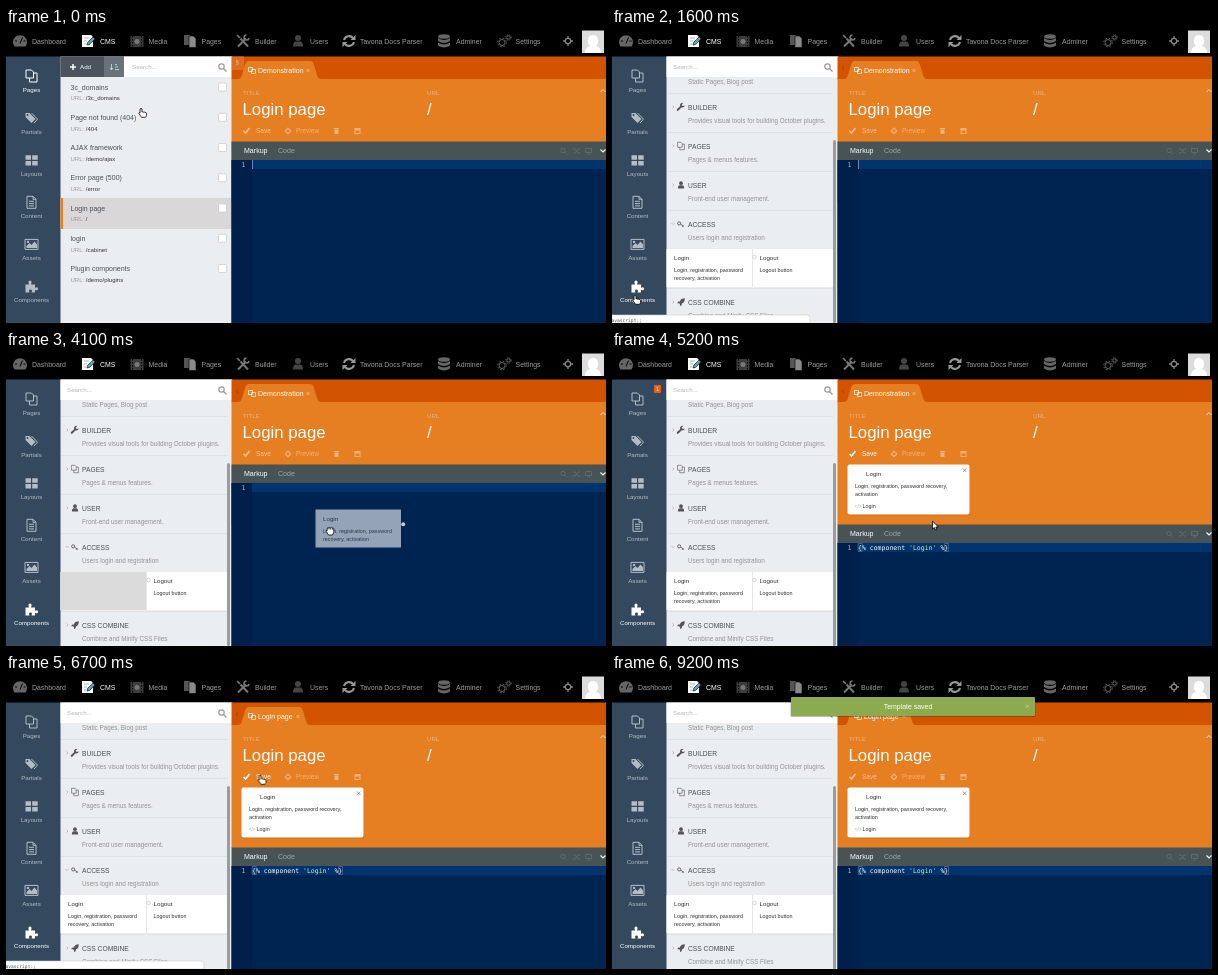
These frames come from a looping animation (600x295 px, 9600 ms). An HTML page:

```html
<!DOCTYPE html>
<html lang="en">
<head>
<meta charset="utf-8">
<title>Component drop</title>
<style>
html, body { margin: 0; width: 100%; height: 100%; overflow: hidden; background: #000; }
svg { display: block; width: 600px; height: 295px; font-family: "Liberation Sans", Arial, sans-serif; fill: currentColor; }
text { white-space: pre; }
.o { fill: none; stroke: currentColor; }
.mid { text-anchor: middle; }
.code { font: 6.53px "DejaVu Sans Mono", monospace; }
.cut { animation: 9.6s step-end infinite; }
.move { animation: 9.6s linear infinite; }

.list { animation-name: list; }
.comps { animation-name: comps; }
.off { animation-name: off; }
.on { animation-name: on; }
.status { animation-name: status; }
.caret { animation-name: caret; }
.ghost { animation-name: ghost; }
.drop { animation-name: drop; }
.pane { animation-name: pane; }
.badge { animation-name: badge; }
.save { animation-name: save; }
.old { animation-name: old; }
.new { animation-name: new; }
.toast { animation-name: toast; }
.pointer { animation-name: pointer; }
.drag { animation-name: drag; }
.hand { animation-name: hand; }
.arrow { animation-name: arrow; }

@keyframes list { 0% { opacity: 1 } 9.3%, to { opacity: 0 } }
@keyframes comps { 0% { opacity: 0 } 9.3%, to { opacity: 1 } }
@keyframes off { 0% { color: #fff } 9.3%, to { color: #b3bdc6 } }
@keyframes on { 0% { color: #b3bdc6 } 9.3%, to { color: #fff } }
@keyframes status { 0% { opacity: 0 } 10.4% { opacity: 1 } 26% { opacity: 0 } 60.3% { opacity: 1 } 84.3%, to { opacity: 0 } }
@keyframes caret { 0% { opacity: 1 } 31.2%, to { opacity: 0 } }
@keyframes ghost { 0% { opacity: 0 } 31.2% { opacity: 1 } 46.8%, to { opacity: 0 } }
@keyframes drop { 0% { opacity: 0 } 46.8%, to { opacity: 1 } }
@keyframes pane { 0% { transform: none } 46.8%, to { transform: translateY(60px) } }
@keyframes badge { 0% { opacity: 0 } 47.8% { opacity: 1 } 69.7%, to { opacity: 0 } }
@keyframes save { 0% { color: #f5c295 } 47.8% { color: #fff } 84.3%, to { color: #f5c295 } }
@keyframes old { 0% { opacity: 1 } 69.7%, to { opacity: 0 } }
@keyframes new { 0% { opacity: 0 } 69.7%, to { opacity: 1 } }
@keyframes toast {
  0%, 70.8% { opacity: 0; transform: translateY(-8px) }
  75%, to { opacity: 1; transform: none }
}
@keyframes pointer {
  0%, 1% { transform: translate(134px, 80px); animation-timing-function: ease-in-out }
  8.4%, 17% { transform: translate(22px, 267px); animation-timing-function: ease-in-out }
  24%, 35.4% { transform: translate(70px, 242px); animation-timing-function: ease-in-out }
  42%, 46.8% { transform: translate(324px, 180px) }
  53%, 56.5% { transform: translate(320px, 170px); animation-timing-function: ease-in-out }
  62%, 83% { transform: translate(253.5px, 101px); animation-timing-function: ease-in }
  89.6%, to { transform: translate(594px, 300px) }
}
@keyframes hand { 0% { opacity: 1 } 23.9% { opacity: 0 } 60.3% { opacity: 1 } 84.3%, to { opacity: 0 } }
@keyframes drag { 0% { opacity: 0 } 23.9% { opacity: 1 } 46.8%, to { opacity: 0 } }
@keyframes arrow { 0% { opacity: 0 } 46.8% { opacity: 1 } 60.3% { opacity: 0 } 84.3%, to { opacity: 1 } }
</style>
</head>
<body>
<svg viewBox="0 0 600 295">
  <rect width="600" height="295" fill="#000"/>
  <g id="nav"></g>
  <rect x="576" y="2.5" width="22" height="22.5" fill="#dcdcdc"/>
  <path d="M579 25q0-6 5-7q-3-3-2-7q1-4 5-4t5 4q1 4-2 7q5 1 5 7z" fill="#fff"/>

  <rect y="28.5" width="55" height="267" fill="#34495e"/>
  <g id="side"></g>
  <g class="cut badge">
    <rect x="42" y="34" width="7" height="8" rx="1" fill="#e2621b"/>
    <text x="45.5" y="40" font-size="5.5" class="mid" fill="#fff">1</text>
  </g>

  <rect x="54.5" y="28.5" width="172" height="267" fill="#ebeef0"/>
  <g class="cut list" id="list"></g>
  <g class="cut comps" id="comps"></g>
  <g fill="none" stroke="#999" stroke-width="1.2"><circle cx="215.5" cy="38.5" r="2.7"/><path d="M217.5 40.5l3 3"/></g>

  <g id="editor">
    <rect x="225.5" y="28.5" width="375" height="23" fill="#d35400"/>
    <path d="M232 38l-2 2 2 2" class="o" color="#a94300"/>
    <g class="cut list">
      <rect x="226" y="28.5" width="12" height="13.5" fill="#dd6d20"/>
      <text x="229.5" y="36" font-size="6" fill="#f3c9a8">§</text>
    </g>
    <g font-size="7" fill="#fff">
      <g class="cut old">
        <path d="M232 51q3 0 4-4l3-10q1-4 4-4h61q3 0 4 4l3 10q1 4 4 4z" fill="#e67e22"/>
        <text x="252" y="44.7">Demonstration</text>
        <path d="M300.5 41l3 3m0-3l-3 3" class="o" color="#f3bf91" stroke-width=".8"/>
      </g>
      <g class="cut new">
        <path d="M232 51q3 0 4-4l3-10q1-4 4-4h50q3 0 4 4l3 10q1 4 4 4z" fill="#e67e22"/>
        <text x="252" y="44.7">Login page</text>
        <path d="M290.5 41l3 3m0-3l-3 3" class="o" color="#f3bf91" stroke-width=".8"/>
      </g>
    </g>
    <rect x="225.5" y="51" width="375" height="123" fill="#e67e22"/>
    <path class="o" color="#fff" d="M242.5 39.5h4v4h-4zM245.5 41.5h4v4h-4z" stroke-width=".7"/>
    <g font-size="6.2" fill="#f1b27c"><text x="237" y="67">TITLE</text><text x="421" y="67">URL</text></g>
    <g font-size="16.8" fill="#fff"><text x="236.5" y="87">Login page</text><text x="421" y="87">/</text></g>
    <path d="M594.5 64l2.5-2.5 2.5 2.5" class="o" color="#f8dcc2"/>
    <g class="cut save">
      <path d="M237.5 103l2 2 4-5" class="o" stroke-width="1.6"/>
      <text x="250" y="105.3" font-size="6.5">Save</text>
    </g>
    <g color="#f2b37d">
      <path class="o" d="M282 100.2l2.7 2.7-2.7 2.7-2.7-2.7z" stroke-width="1.2"/>
      <text x="290" y="105.3" font-size="6.5">Preview</text>
      <path d="M328 100h5v1h-5zM328.5 101.5h4v4.5h-4zM348.5 100h6v6h-6z"/>
      <path d="M349.5 102.5h4v2.5h-4z" fill="#e67e22"/>
    </g>
    <g class="cut drop">
      <rect x="236" y="114.5" width="122" height="50" rx="2" fill="#b9651b" opacity=".6"/>
      <rect x="235.5" y="113.5" width="122" height="50" rx="2" fill="#fff"/>
      <path d="M351 117.5l3.4 3.4m0-3.4l-3.4 3.4" class="o" color="#777" stroke-width=".7"/>
      <text x="254" y="124.5" font-size="6.2" fill="#333">Login</text>
      <g font-size="5.4" fill="#333">
        <text x="243" y="137">Login, registration, password recovery,</text>
        <text x="243" y="145">activation</text>
        <text x="250.5" y="157">Login</text>
        <text x="242.5" y="156.8" fill="#aaa" font-size="5">&lt;/&gt;</text>
      </g>
    </g>
    <g class="cut pane">
      <rect x="225.5" y="113.5" width="375" height="19" fill="#475354"/>
      <text x="238" y="125.3" font-size="7.05" fill="#fff">Markup</text>
      <text x="272" y="125.3" font-size="7.05" fill="#9da5a5">Code</text>
      <g class="o" color="#5e6a6b">
        <circle cx="557" cy="122.5" r="2.2"/><path d="M558.5 124l2.5 2.5M567 121h2l3 4h2M567 125h2l3-4h2M579.5 120.5h6v4h-6zM581 126h3"/>
        <path d="M594.5 121.5l2.5 2.5 2.5-2.5" stroke="#fff" stroke-width="1.1"/>
      </g>
      <rect x="225.5" y="132" width="375" height="163" fill="#002451"/>
      <rect x="225.5" y="132" width="20.5" height="163" fill="#00204b"/>
      <rect x="246" y="132" width="354" height="9" fill="#00346e"/>
      <text x="235.5" y="139.3" class="code" fill="#a5b5d0">1</text>
      <rect class="cut caret" x="246" y="132" width=".8" height="9" fill="#7d9cc6"/>
      <g class="cut drop">
        <path class="o" color="#54739c" d="M246.2 132.5h4v8h-4zM332.5 132.5h4v8h-4z" stroke-width=".7"/>
        <text x="246" y="139.3" class="code" fill="#fff">{% component <tspan fill="#d1f1a9">'Login'</tspan> %}</text>
      </g>
    </g>
  </g>

  <g class="cut status">
    <path d="M0 287h195q3 0 3 3v5h-198z" fill="#fff" stroke="#ccc" stroke-width=".6"/>
    <text x="-.5" y="293.8" font-size="4.6" font-family="DejaVu Sans Mono, monospace" fill="#555">avascript:;</text>
  </g>

  <g class="move toast">
    <rect x="178.5" y="23" width="245" height="20" rx="1.5" opacity=".25" fill="#000"/>
    <rect x="179" y="23" width="244" height="19" rx="1" fill="#8cab50"/>
    <text x="296" y="35" font-size="6.95" fill="#fff" class="mid">Template saved</text>
    <path d="M413.8 30.5l3.4 3.4m0-3.4l-3.4 3.4" class="o" color="#bdd093" stroke-width=".9"/>
  </g>

  <g class="move pointer">
    <g class="cut ghost">
      <rect x="-14.5" y="-21.5" width="85.5" height="38" fill="#fff" opacity=".58"/>
      <circle cx="73.2" cy="-6.7" r="2" fill="#c3ccd8"/>
      <g fill="#27394f">
        <text x="-7" y="-10.3" font-size="6.2">Login</text>
        <text x="-7" y="2" font-size="5.4">Login, registration, password</text>
        <text x="-7" y="9.8" font-size="5.4">recovery, activation</text>
      </g>
    </g>
    <g fill="#fff" stroke="#000" stroke-width=".8" stroke-linejoin="round">
      <path class="cut hand" d="M0 1q1-1.5 2 0v3q1-.8 1.5.2q1-.5 1.5.4q1.200-.4 1.500.6v2.300q-.3 1-1 1.800h-4l-2.700-4q.2-1.200 1.200-.3z"/>
      <path class="cut drag" d="M-3 0l.3-3q1-1 1.600 0q.8-1.200 1.700-.2q1-.8 1.700.2q1.200-.4 1.500.6v3.800l-1.300 2.600h-4l-2.600-4q.2-1 1.100 0zM-1-3v1.500M.7-3v1.500M2.400-2.800v1.500"/>
      <path class="cut arrow" d="M.5 0v8.200l1.900-1.700 1.300 2.700 1.300-.6-1.200-2.600h2.500z"/>
    </g>
  </g>
</svg>
<script>
const glyph = {
  gauge: '<path d="M-5.500 5.500a7 7 0 1 1 11 0z"/><path d="M0 2.500l2.500-6M-5 0h2M3.500 0h2" stroke="#000" fill="none"/>',
  note: '<path d="M-6-6h9l2 2v10h-11z"/><path d="M-4-3h5M-4 0h3M-4 3h2" stroke="#9bb" fill="none"/><path d="M-1 4l.6-2.600 5.500-5.500 2 2-5.500 5.500z" fill="#5aa5b5" stroke="#000" stroke-width=".6"/>',
  film: '<path d="M-6.500-5h13v11h-13z"/><path d="M-4.500-5v11M4.500-5v11" stroke="#000" fill="none" stroke-dasharray="1.500 1.500"/><circle cy=".5" r="2.500" fill="#777"/>',
  copy: '<path class="o" d="M-5.500-6h5.500l2 2v6h-7.500zM-2 2v4h7.500v-9h-3.500"/>',
  sheets: '<path d="M-6-6h6v10h-6z"/><path d="M-1-5h4.500l2.500 2.500v9h-7z" fill="#8a8a8a" stroke="#000" stroke-width=".6"/>',
  tools: '<path class="o" stroke-width="2" d="M-5 5.500l8-8M-2.500-2.500l7.500 8"/><path class="o" stroke-width="1.600" d="M3.500-6a2.500 2.500 0 1 0 2.500 3M-6-6l3 3"/>',
  wrench: '<path d="M6-3a4 4 0 0 1-5.300 3.700l-4.700 5a1.600 1.600 0 0 1-2.400-2.400l5-4.700a4 4 0 0 1 5-5.100l-2.400 2.600.5 1.600 1.700.5z"/>',
  user: '<circle cy="-3" r="3"/><path d="M-5 5.500q0-5 3-5h4q3 0 3 5z"/>',
  cycle: '<path class="o" stroke-width="2" d="M-5-1a5.200 5.200 0 0 1 9-2M5 1a5.200 5.200 0 0 1-9 2"/><path d="M6.500-6v5h-5zM-6.500 6v-5h5z"/>',
  db: '<ellipse cy="-4.500" rx="6" ry="2.300"/><path d="M-6-3q6 4 12 0v3q-6 4-12 0zM-6 1.500q6 4 12 0v3q-6 4-12 0z"/>',
  gears: '<circle class="o" cx="-2" cy="1.500" r="3"/><circle class="o" cx="-2" cy="1.500" r="4.300" stroke-dasharray="1.700 1.700"/><circle class="o" cx="4.500" cy="-3.500" r="1.700"/><circle class="o" cx="4.500" cy="-3.500" r="2.700" stroke-dasharray="1.100 1.100"/>',
  target: '<circle class="o" r="2.700" stroke-width="1.300"/><path class="o" d="M0-5v3M0 2v3M-5 0h3M2 0h3" stroke-width="1.300"/>',
  tags: '<path d="M-6-5h4l6 6-4 4-6-6z"/><path class="o" d="M0-5l6 6-3.500 4"/><circle cx="-4" cy="-3" r="1" fill="#34495e"/>',
  grid: '<path d="M-6-5h5.500v4.500h-5.500zM.7-5h5.500v4.500h-5.500zM-6 .7h5.500v4.500h-5.500zM.7.7h5.500v4.500h-5.500z"/>',
  page: '<path class="o" d="M-4.500-6h6l3 3v9h-9zM1.500-6v3h3M-2.500-1h5M-2.500 1.300h5M-2.500 3.600h5"/>',
  image: '<path class="o" d="M-6.500-5h13v10h-13z"/><path d="M-5 3.500v-2l3-3 2 2 3-3.500 2.500 3v3.500z"/><circle cx="-3.500" cy="-2.500" r="1.200"/>',
  puzzle: '<path d="M-6-2h3.500q-1.500-4 1-4t1 4h4v3.200q3-1.500 3 1t-3 1v2.800h-3.500q1.300-3-1-3t-1 3h-4z"/>',
  key: '<circle class="o" cx="-3" cy="-1" r="2.500" stroke-width="1.400"/><path class="o" d="M-1 0l6 4M3 2.500l-1 2" stroke-width="1.400"/>',
  rocket: '<path d="M6-6q-6 0-8 5l-3 .5-1 2.500 3 .2 1.200 1.200.3 3 2.500-1 .5-3q5-2 4.500-8.400z"/>'
};
const $ = id => document.getElementById(id);
const icon = (name, x, y, scale = 1) =>
  `<g transform="translate(${x} ${y}) scale(${scale})">${glyph[name]}</g>`;
const text = (x, y, size, str, color = 'currentColor', cls = '') =>
  `<text x="${x}" y="${y}" font-size="${size}" fill="${color}" class="${cls}">${str}</text>`;

$('nav').innerHTML = [
  ['gauge', 14, 26, 'Dashboard', '#666'], ['note', 82, 94, 'CMS', '#fff'], ['film', 131, 142.5, 'Media', '#3c3c3c'],
  ['sheets', 184, 195.5, 'Pages', '#555'], ['tools', 237, 249, 'Builder', '#777'], ['user', 292, 304, 'Users', '#444'],
  ['cycle', 343, 354, 'Tavona Docs Parser', '#999'], ['db', 438, 450, 'Adminer', '#666'],
  ['gears', 498, 509.5, 'Settings', '#666'], ['target', 562, 575, '', '#888']
].map(([name, x, tx, label, shade]) =>
  `<g color="${shade}">${icon(name, x, 13)}</g>` +
  text(tx, 15.7, 6.95, label, label === 'CMS' ? '#fff' : '#9a9a9a')
).join('');

$('side').innerHTML = [
  ['copy', 'Pages', 'cut off'], ['tags', 'Partials', ''], ['grid', 'Layouts', ''],
  ['page', 'Content', ''], ['image', 'Assets', ''], ['puzzle', 'Components', 'cut on']
].map(([name, label, cls], i) => {
  const y = 48 + i * 42.1;
  return `<g color="#b3bdc6" class="${cls}">${icon(name, 25.5, y)}${text(25.5, y + 15.8, 6.2, label, undefined, 'mid')}</g>`;
}).join('');

$('list').innerHTML = `
  <rect x="54.5" y="28.5" width="44" height="20.5" fill="#4b545d"/>
  <rect x="98" y="28.5" width="20" height="20.5" fill="#69727a"/>
  <rect x="118" y="28.5" width="108" height="20.5" fill="#fff"/>
  <path d="M64 39h6m-3-3v6" stroke="#fff" stroke-width="1.5"/>
  <path d="M105.5 36v6m-1.500-2l1.500 2 1.500-2M109 36.500h2M109 39h3M109 41.500h4" class="o" color="#ccd0d4" stroke-width=".9"/>
  ${text(74, 41.3, 6.2, 'Add', '#fff')}${text(126, 41.2, 6.2, 'Search...', '#b5b5b5')}
  <rect x="54.5" y="170" width="172" height="31" fill="#d9d7d8"/>
  <rect x="54.5" y="170" width="2.5" height="31" fill="#e67e22"/>` + [
  ['3c_domains', '/3c_domains'], ['Page not found (404)', '/404'], ['AJAX framework', '/demo/ajax'],
  ['Error page (500)', '/error'], ['Login page', '/'], ['login', '/cabinet'], ['Plugin components', '/demo/plugins']
].map(([name, url], i) => {
  const y = 61.5 + i * 30.25;
  return text(64.5, y, 7, name, '#4a5156') +
    text(64.5, y + 10.8, 6, `URL: <tspan fill="#333">${url}</tspan>`, '#999') +
    `<rect x="212.5" y="${y - 6.5}" width="8" height="8" rx="1" fill="#fff" stroke="#ccc" stroke-width=".8"/>`;
}).join('');

const entry = ([name, label, note, y]) => `
  <path d="M55 ${y - 13.5}h166" stroke="#e0e3e5"/>
  <path d="${label === 'ACCESS' ? `M59.5 ${y - 1}l1.5 1.5 1.5-1.5` : `M60.5 ${y - 1.5}l1.5 1.5-1.5 1.5`}" class="o" color="#aaa" stroke-width=".7"/>
  <g color="#555">${icon(name, 69, y, .62)}</g>
  ${text(76, y + 2.5, 6.7, label, '#4a4f53')}${text(76, y + 16, 6.3, note, '#929292')}`;

$('comps').innerHTML = `
  <rect x="54.5" y="28.5" width="171.5" height="20.5" fill="#fff"/>
  ${text(61, 41.2, 6.2, 'Search...', '#b5b5b5')}${text(76, 56.3, 6.3, 'Static Pages, Blog post', '#929292')}` + [
  ['wrench', 'BUILDER', 'Provides visual tools for building October plugins.', 79],
  ['copy', 'PAGES', 'Pages &amp; menus features.', 118],
  ['user', 'USER', 'Front-end user management.', 157],
  ['key', 'ACCESS', 'Users login and registration', 196],
  ['rocket', 'CSS COMBINE', 'Combine and Minify CSS Files', 274]
].map(entry).join('') + `
  <rect x="54.5" y="221" width="169.5" height="38" fill="#fff"/>
  <path d="M140.5 221v38" stroke="#e6e6e6"/>
  <circle cx="142.5" cy="229" r="1.8" fill="#fff" stroke="#ccc" stroke-width=".7"/>
  ${text(62, 232, 6.2, 'Login', '#333')}${text(62, 244, 5.4, 'Login, registration, password', '#333')}
  ${text(62, 251.8, 5.4, 'recovery, activation', '#333')}
  ${text(147.5, 232, 6.2, 'Logout', '#333')}${text(147.5, 244, 5.4, 'Logout button', '#333')}
  <rect class="cut ghost" x="54.5" y="221" width="85.5" height="38" fill="#dbdbdb"/>
  <rect x="221" y="112" width="3" height="183" rx="1.5" fill="#9a9c9e"/>`;
</script>
</body>
</html>
```
